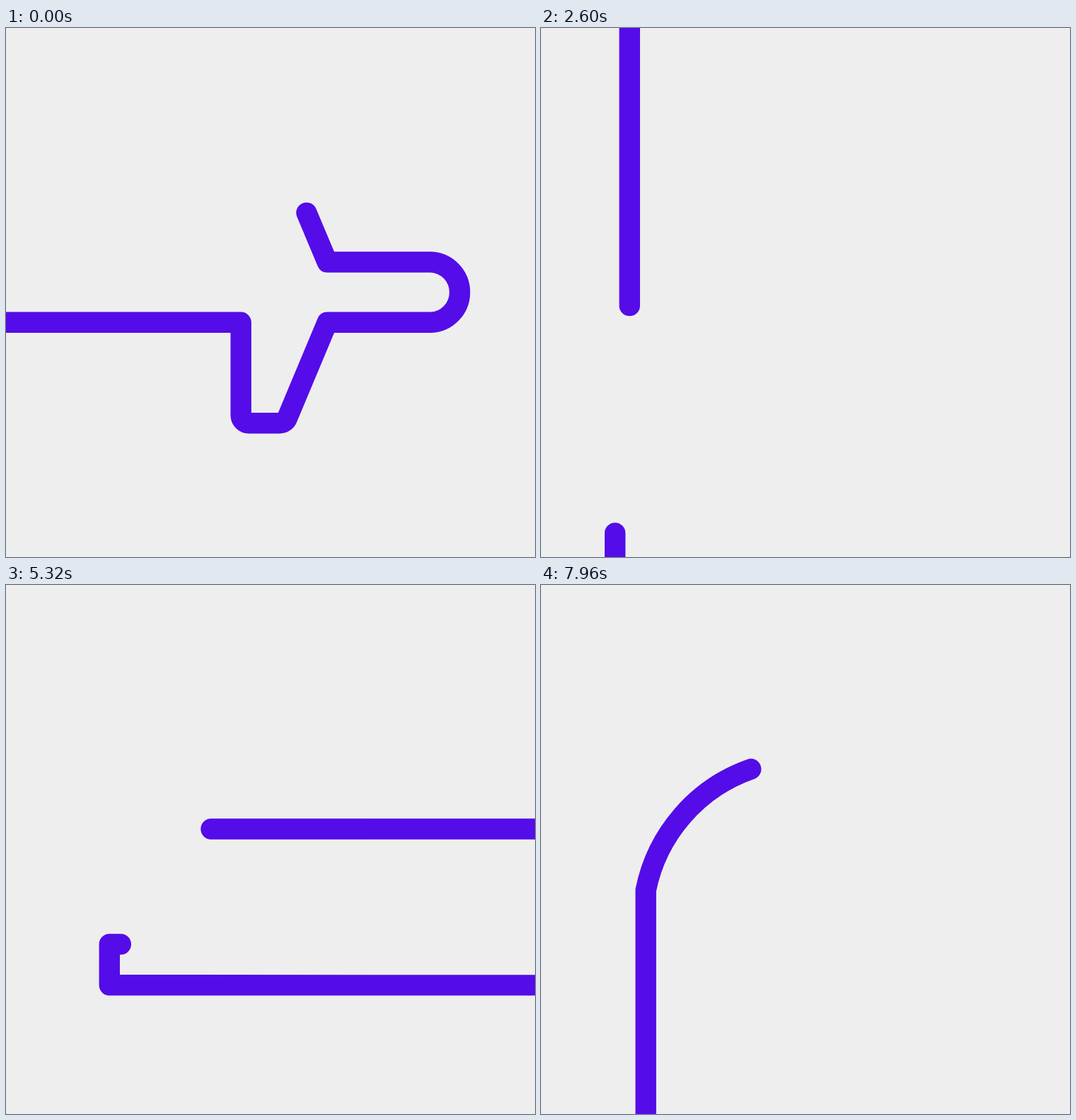
These frames come from a looping animation (748 px wide and 748 px high, 8 s). An HTML page:

```html
<!DOCTYPE html>
<html lang="en">
<head>
<meta charset="utf-8">
<title>Travel icons in one line</title>
<style>
  html, body { margin: 0; width: 100%; height: 100%; overflow: hidden; background: #eee; }
  svg { display: block; width: 100%; height: 100%; }
  svg * { fill: none; stroke: #540ce8; stroke-width: 29.4; stroke-linecap: round; stroke-linejoin: round; }
  svg .wheel { fill: #eee; }
</style>
</head>
<body>
<svg viewBox="0 0 748 748">
  <path id="plane" d="M-1200 416.3H332.2V547.5A11.4 11.4 0 0 0 343.6 558.8H387A11.4 11.4 0 0 0 397.5 551.8L454.3 416.3H601A42.7 42.7 0 0 0 601 331H454.3L397.5 196A11.4 11.4 0 0 0 387 189.2H343.6A11.4 11.4 0 0 0 332.2 200.6V331H194.5L141 283.2H104.7V1400"/>
  <path id="car" d="M125.3 -1200V475L641 475.7A23.3 23.3 0 0 0 664.3 452.5V392.5L500.5 266.5C467 241 427 228.3 386 228.3L242 229C219 229 199 239 184.3 256L123.5 345H1600"/>
  <path id="bell" d="M1800 566L146.3 565.8V508L600 508.3A229.2 229.2 0 0 0 372.5 247.3A229.2 229.2 0 0 0 148.2 431.5V1600"/>
  <path id="pillar"/>
  <path id="knob"/>
  <circle id="rear" class="wheel" r="48.6"/>
  <circle id="front" class="wheel" r="48.6"/>
</svg>
<script>
const LOOP = 8000, STEP = 40;
const $ = id => document.getElementById(id);
const clamp = (x, lo = 0, hi = 1) => Math.min(hi, Math.max(lo, x));

// lead, out: path length before and after the resting icon
// rest, exit: times of arrival and departure; pace: speed of arrival
const lines = [
  { el: $('plane'), lead: 1399.5, out: 1033.5, rest: 782, exit: 1650, pace: 1 },
  { el: $('car'), lead: 1663.5, out: 1068, rest: 3800, exit: 4490, pace: 1 },
  { el: $('bell'), lead: 1197.7, out: 1172, rest: 6240, exit: 7130, pace: 1.1 }
];
for (const line of lines) line.total = line.el.getTotalLength();

// Distance still to go, u ms before arrival
const headLag = u => u > 1200 ? 1750 + 3.3 * (u - 1200) : 5.687e-4 * u ** 2 + 5.389e-7 * u ** 3;
const tailLag = u => 600 * (Math.max(0, u - 380) / 420) ** 2;
// Distance covered, e ms after departure
const headRun = e => 112 * (e / 190) ** 1.8;
const tailRun = e => 1437 * (Math.max(0, e - 220) / 610) ** 1.66;

function drawLine({ el, lead, out, rest, exit, pace, total }, t) {
  const u = Math.max(0, rest - t) * pace, e = Math.max(0, t - exit);
  const start = clamp(lead - tailLag(u) + tailRun(e), 0, total);
  const end = clamp(total - out - headLag(u) + headRun(e), 0, total);
  el.style.display = end > start ? '' : 'none';
  el.setAttribute('stroke-dasharray', `${Math.max(0, end - start)} 9999`);
  el.setAttribute('stroke-dashoffset', -start);
}

// 0 to 1 from begin on, back to 0 within fade ms after exit
function grow(t, begin, time, exit, fade) {
  return t < exit
    ? 1 - (1 - clamp((t - begin) / time)) ** 3
    : 1 - clamp((t - exit) / fade) ** 2;
}

function drawPost(id, x, y, length, k) {
  $(id).style.display = k > 0 ? '' : 'none';
  $(id).setAttribute('d', `M${x} ${y}v${length * k}`);
}

function drawWheel(id, x, y, k) {
  $(id).style.display = k > 0 ? '' : 'none';
  $(id).setAttribute('transform', `translate(${x} ${y}) scale(${k})`);
}

function frame(now) {
  const t = Math.floor((now % LOOP) / STEP) * STEP;
  for (const line of lines) drawLine(line, t);
  drawPost('pillar', 309, 228, 117, grow(t, 3360, 400, 4490, 225));
  drawPost('knob', 374.8, 247, -65, grow(t, 5780, 370, 7130, 225));
  drawWheel('rear', 261, 479.8, grow(t, 2880, 400, 4490, 218));
  drawWheel('front', 489.5, 480, grow(t, 2940, 400, 4490, 218));
  requestAnimationFrame(frame);
}
frame(0);
</script>
</body>
</html>
```
